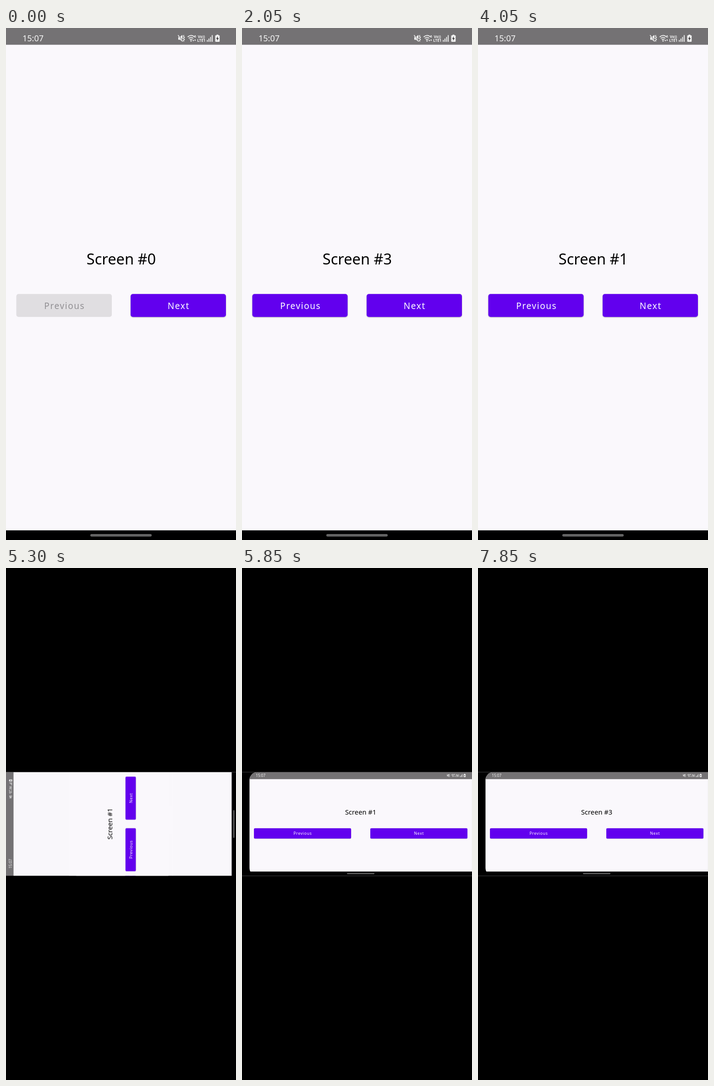
An HTML page that plays this animation: 502 by 1115 pixels, repeating every 8 s.

```html
<!DOCTYPE html>
<html lang="en">
<head>
<meta charset="utf-8">
<title>Screen rotation</title>
<style>
  html, body { margin: 0; width: 100%; height: 100%; overflow: hidden; background: #000; }
  svg { display: block; width: 100vw; height: 100vh; }

  text { font-family: "Noto Sans", "Open Sans", sans-serif; text-anchor: middle; }
  .title { font-size: 32.6px; fill: #000; }
  .label { font-size: 19px; letter-spacing: 1.6px; fill: #fff; }
  .clock { font-size: 18px; fill: #f6f6f6; text-anchor: start; }
  .tiny { font-size: 8px; font-weight: 600; fill: #f6f6f6; }
  .bar { fill: #747274; }
  .page { fill: #faf8fc; }
  .pill { fill: #646464; }
  .btn { fill: #6200ee; filter: drop-shadow(0 1.5px 1.2px rgba(0, 0, 0, .28)); }
  .off rect { fill: #e0dee1; }
  .off .label { fill: #929094; }

  /* Everything shares one 8 s loop */
  .n0, .n1, .n2, .n3, .off, .on, .portrait, .landscape, .mask, .dim, .dot {
    animation: 8s linear infinite;
  }
  .n0, .off { animation-name: zero; }
  .on { animation-name: enabled; }
  .n1 { animation-name: one; }
  .n2 { animation-name: two; }
  .n3 { animation-name: three; }
  .n0, .n1, .n2, .n3, .off, .on, .mask { animation-timing-function: step-end; }

  @keyframes zero { 0% { visibility: visible } 11.25%, 100% { visibility: hidden } }
  @keyframes enabled { 0% { visibility: hidden } 11.25%, 100% { visibility: visible } }
  @keyframes one {
    0%, 16.25%, 86.875%, 100% { visibility: hidden }
    11.25%, 45% { visibility: visible }
  }
  @keyframes two {
    0%, 21.875%, 45%, 93.75%, 100% { visibility: hidden }
    16.25%, 39.375%, 86.875% { visibility: visible }
  }
  @keyframes three {
    0%, 39.375% { visibility: hidden }
    21.875%, 93.75%, 100% { visibility: visible }
  }

  /* Taps: each starts at its own --at */
  .dim, .dot { opacity: 0; animation-delay: var(--at); }
  .dim { fill: #000; animation-name: dim; }
  .dot { animation-name: touch; }
  @keyframes dim {
    0% { opacity: 0 }
    .9%, 3.3% { opacity: .14 }
    5.6%, 100% { opacity: 0 }
  }
  @keyframes touch {
    0%, 2.5% { opacity: 1 }
    3.75%, 100% { opacity: 0 }
  }

  /* Turning the phone */
  .portrait, .landscape { transform-origin: 251px 557.5px; }
  .portrait { animation-name: leave; }
  .landscape { animation-name: enter; }
  .mask { animation-name: mask; }
  @keyframes leave {
    0%, 65.62% { transform: none; opacity: 1 }
    65.625% { transform: rotate(-90deg) scale(.4502); opacity: 1 }
    66.25% {
      transform: rotate(-90deg) scale(.4502); opacity: 1;
      animation-timing-function: cubic-bezier(.4, 0, .2, 1);
    }
    73.1%, 100% { transform: rotate(0deg) scale(.4502); opacity: 0 }
  }
  @keyframes enter {
    0%, 66.24% { transform: rotate(-90deg); opacity: 0 }
    66.25% {
      transform: rotate(-90deg); opacity: 1;
      animation-timing-function: cubic-bezier(.4, 0, .2, 1);
    }
    73.1%, 100% { transform: rotate(0deg); opacity: 1 }
  }
  @keyframes mask { 0% { visibility: hidden } 65.625%, 100% { visibility: visible } }
</style>
</head>
<body>
<svg viewBox="0 0 502 1115">
  <defs>
    <g id="icons" fill="#f6f6f6" stroke="none">
      <!-- muted speaker with vibration -->
      <path d="M376 19.5h3.5l5.5-4.5v15l-5.5-4.5H376z"/>
      <path d="M375.5 15l10.5 14.5" stroke="#747274" stroke-width="3"/>
      <path d="M375.5 15.5l10 14M388.5 15.5l-1.5 2.3 2.6 2.4-2.6 2.4 2.6 2.4-2.6 2.4 1.6 2" fill="none" stroke="#f6f6f6" stroke-width="1.5"/>
      <!-- wifi -->
      <g fill="none" stroke="#f6f6f6" stroke-width="1.7">
        <path d="M396.5 19.5q7.5-6.5 14.5-.5"/>
        <path d="M398.8 22.6q5.2-4.6 10 0"/>
        <path d="M401.2 25.5q2.8-2.4 5.4 0"/>
      </g>
      <circle cx="403.9" cy="28" r="1.5"/>
      <path d="M407.2 26h3.2l-1.6 3.5zM411.2 27.5h3.2l-1.6-3.5z"/>
      <text class="tiny" x="412.8" y="21" style="font-size:7px">6</text>
      <!-- network -->
      <text class="tiny" x="426.4" y="21.8">Vo))</text>
      <text class="tiny" x="426.2" y="29.8">LTE1</text>
      <path d="M438.5 26h1.8v4h-1.8zM442 23h1.8v7H442zM445.6 19.5h1.8V30h-1.8zM449.2 15.5h1.8V30h-1.8z"/>
      <!-- battery -->
      <path d="M459.5 14.5h4v1.5h1.5q1.3 0 1.3 1.3v11.4q0 1.3-1.3 1.3h-7q-1.3 0-1.3-1.3V17.3q0-1.3 1.3-1.3h1.5z"/>
      <path d="M462.6 17.5l-4 6.2h2.5l-.8 4.6 4.2-6.2h-2.6z" fill="#3c3a3c"/>
    </g>
    <g id="touch" fill="#fff">
      <circle r="19" fill-opacity=".06"/>
      <circle r="15" fill-opacity=".19"/>
    </g>
    <clipPath id="display"><rect x="36" width="1160" height="502" rx="39"/></clipPath>
  </defs>

  <rect width="502" height="1115"/>

  <g class="landscape">
    <g transform="translate(0 444.5) scale(.4502)">
      <rect width="1115" height="502"/>
      <g clip-path="url(#display)">
        <rect class="page" x="36" width="1079" height="481"/>
        <rect class="bar" x="36" width="1079" height="34"/>
      </g>
      <text class="clock" x="67.5" y="23.2">15:07</text>
      <use href="#icons" x="618" y="-6"/>
      <rect class="pill" x="509" y="488" width="133" height="5.5" rx="2.75"/>
      <text class="title n1" x="575.5" y="206.4">Screen #1</text>
      <text class="title n2" x="575.5" y="206.4">Screen #2</text>
      <text class="title n3" x="575.5" y="206.4">Screen #3</text>
      <rect class="btn" x="58" y="271.5" width="471" height="50" rx="5"/>
      <text class="label" x="294.3" y="303.5">Previous</text>
      <rect class="btn" x="622" y="271.5" width="471" height="50" rx="5"/>
      <text class="label" x="858.3" y="303.5">Next</text>
      <g style="--at:6.8s">
        <rect class="dim" x="622" y="271.5" width="471" height="50" rx="5"/>
        <use class="dot" href="#touch" x="977" y="297"/>
      </g>
      <g style="--at:7.35s">
        <rect class="dim" x="622" y="271.5" width="471" height="50" rx="5"/>
        <use class="dot" href="#touch" x="977" y="297"/>
      </g>
    </g>
  </g>

  <g class="portrait">
    <rect width="502" height="1115"/>
    <rect class="page" width="502" height="1094"/>
    <rect class="bar" width="502" height="36.5"/>
    <text class="clock" x="36" y="29">15:07</text>
    <use href="#icons"/>
    <rect class="pill" x="184" y="1102" width="134" height="5.5" rx="2.75"/>
    <text class="title n0" x="251.5" y="515">Screen #0</text>
    <text class="title n1" x="251.5" y="515">Screen #1</text>
    <text class="title n2" x="251.5" y="515">Screen #2</text>
    <text class="title n3" x="251.5" y="515">Screen #3</text>
    <g class="off">
      <rect x="22.5" y="579.3" width="208.5" height="50" rx="5"/>
      <text class="label" x="127.8" y="612">Previous</text>
    </g>
    <g class="on">
      <rect class="btn" x="22.5" y="579.3" width="208" height="50" rx="5"/>
      <text class="label" x="127.8" y="612">Previous</text>
    </g>
    <rect class="btn" x="272" y="579.3" width="208" height="50" rx="5"/>
    <text class="label" x="376.8" y="612">Next</text>
    <g style="--at:.75s">
      <rect class="dim" x="272" y="579.3" width="208" height="50" rx="5"/>
      <use class="dot" href="#touch" x="425.5" y="604"/>
    </g>
    <g style="--at:1.175s">
      <rect class="dim" x="272" y="579.3" width="208" height="50" rx="5"/>
      <use class="dot" href="#touch" x="425.5" y="604"/>
    </g>
    <g style="--at:1.6s">
      <rect class="dim" x="272" y="579.3" width="208" height="50" rx="5"/>
      <use class="dot" href="#touch" x="425.5" y="604"/>
    </g>
    <g style="--at:3s">
      <rect class="dim" x="22.5" y="579.3" width="208" height="50" rx="5"/>
      <use class="dot" href="#touch" x="140" y="604"/>
    </g>
    <g style="--at:3.45s">
      <rect class="dim" x="22.5" y="579.3" width="208" height="50" rx="5"/>
      <use class="dot" href="#touch" x="140" y="604"/>
    </g>
  </g>

  <path class="mask" d="M0 0h502v444.5H0zM0 670.5h502V1115H0z"/>
</svg>
</body>
</html>
```
